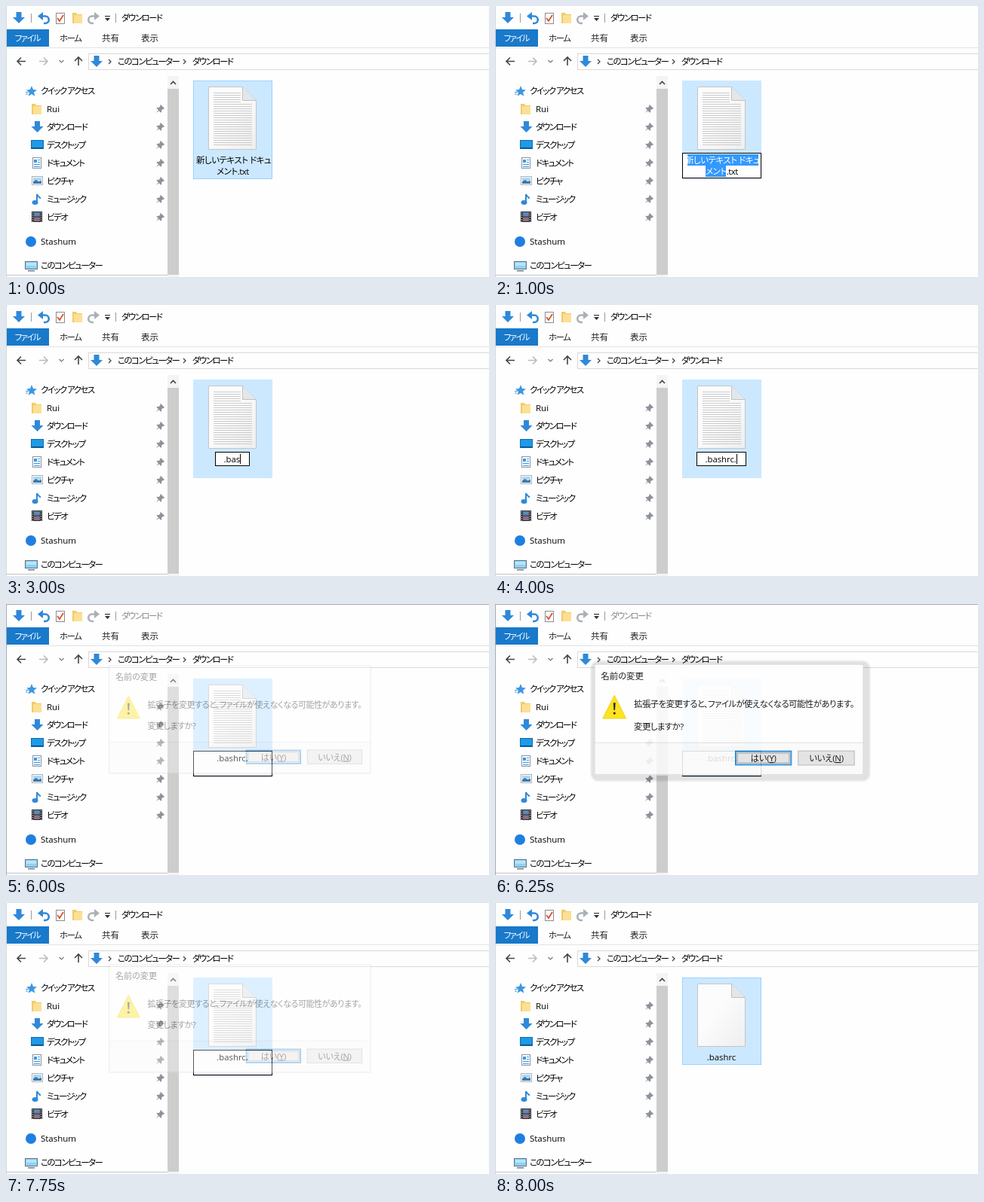
Write an HTML page that moves like this. It is 640 px wide and 360 px high and loops after 10 s.

```html
<!DOCTYPE html>
<html lang="ja">
<head>
<meta charset="utf-8">
<title>ファイル名の変更</title>
<style>
html, body { margin: 0; width: 100%; height: 100%; overflow: hidden; background: #fefefe; }
svg { display: block; width: 100vw; height: 100vh; }
text {
  font: 11.5px "Open Sans", "Noto Sans CJK JP", "Noto Sans CJK", sans-serif;
  font-feature-settings: "palt";
  fill: #000;
  white-space: pre;
}
.kana { letter-spacing: -1.55px; }
.mixed { letter-spacing: -.5px; }
.body { letter-spacing: -.52px; }
.key { letter-spacing: -.25px; }
.name { font-size: 11.3px; }
.mid { text-anchor: middle; }
</style>
</head>
<body>
<svg id="stage" viewBox="0 0 640 360" xmlns="http://www.w3.org/2000/svg"></svg>
<script>
const BLUE = '#2f89d8';
const SELECT = '#cce8ff';
const LOOP = 10000;

const at = (x, y, body) => `<g transform="translate(${x} ${y})">${body}</g>`;
const rect = (x, y, w, h, fill, more = '') =>
  `<rect x="${x}" y="${y}" width="${w}" height="${h}" fill="${fill}" ${more}/>`;
const frame = (x, y, w, h, fill, stroke) =>
  rect(x + .5, y + .5, w - 1, h - 1, fill, `stroke="${stroke}"`);
const fillPath = (d, fill) => `<path d="${d}" fill="${fill}"/>`;
const linePath = (d, stroke, width = 1) =>
  `<path d="${d}" fill="none" stroke="${stroke}" stroke-width="${width}"/>`;
const label = (x, y, str, cls = 'kana', fill = '#000') =>
  `<text x="${x}" y="${y}" class="${cls}" style="fill:${fill}">${str}</text>`;

const icon = {
  down: fillPath('M4 0h7v7h4.500L7.500 15 -.5 7H4z', BLUE),
  folder: fillPath('M0 1h5l1 2h7v12H0z', '#f0cb68') + fillPath('M2 4h11v11H2z', '#fddf94'),
  star: fillPath('M8 0l2 5 5 .4-4 3.300 1.400 5L8 11l-4.400 2.700L5 8.700 1 5.400 6 5z', '#3b97e0') +
    linePath('M0 8.500h4M0 11h3', '#3b97e0'),
  desktop: frame(-1, 1, 17, 12, '#1c9be8', '#1768a8') + rect(0, 11, 15, 1, '#0c4c7c'),
  doc: frame(1, 0, 12, 15, '#fff', '#8795a3') + rect(3, 3, 4, 4, '#3b97e0') +
    linePath('M8 3.500h3M8 6.500h3M3 9.500h8M3 12.500h8', '#3b97e0'),
  picture: frame(0, 1, 15, 12, '#fff', '#a7b1ba') + rect(2, 3, 11, 4, '#a9d8f5') +
    fillPath('M2 11V8l4-2 3 2 4-1v4z', '#3f79a8'),
  music: linePath('M7 12V1q1 3 5 5.500', BLUE, 2) +
    `<ellipse cx="4.500" cy="12" rx="4" ry="3" fill="${BLUE}"/>`,
  video: rect(0, 0, 14, 14, '#2b2b2b') + rect(3, 1, 8, 5.5, '#5c86b5') + rect(3, 7.5, 8, 5.5, '#8a6f86') +
    '<path d="M1.500 1v13M12.500 1v13" stroke="#ddd" stroke-dasharray="1.500 1.500"/>',
  cloud: '<circle cx="8" cy="7" r="7" fill="#1f7fe0"/>',
  pc: frame(0, 0, 17, 11, '#8fd0f5', '#5f7382') + rect(2, 2, 13, 4, '#b9e4fa') + rect(4, 12, 9, 1.5, '#6e7c88'),
  pin: fillPath('M6 0l5 5-1 1-1-.3-2 2 .2 2-1 1L3.700 8.200 0 11l2.800-3.700L.5 4.800l1-1 2 .2 2-2L5 1z', '#8c939d')
};

const chevron = (x, y) => linePath(`M${x} ${y - 3}l3 3-3 3`, '#444', 1.3);
const arrow = (x, color) => linePath(`M${x + 12} 73.500H${x + 1}m5 -5l-5 5 5 5`, color, 1.6);
const curl = color => linePath('M5 5h5a4.500 4.500 0 0 1 0 9.500H8', color, 2.6) + fillPath('M0 5l7-5.500v11z', color);

function titleBar() {
  return at(9.5, 8, icon.down) +
    linePath('M33.500 10v12M145.500 10v12', '#999') +
    at(42, 8.5, curl(BLUE)) +
    frame(66, 9, 12, 15, '#fff', '#8c8c8c') + linePath('M68 16l3 4 5-8', '#d9512c', 1.8) +
    at(88, 8, icon.folder) +
    `<g transform="translate(124 8.500) scale(-1 1)">${curl('#aab0b6')}</g>` +
    rect(131, 13, 7, 1.2, '#333') + fillPath('M131 16h7l-3.500 4z', '#333') +
    '<g id="caption">' + label(153, 20, 'ダウンロード') + '</g>';
}

function ribbon() {
  return rect(0, 55, 640, 1, '#e2e3e4') + rect(1, 31, 56, 23, '#1979ca') +
    label(11.5, 46.5, 'ファイル', 'kana', '#fff') +
    label(71, 46.5, 'ホーム', 'kana', '#222') +
    label(127, 46.5, '共有', '', '#222') +
    label(179, 46.5, '表示', '', '#222');
}

function addressBar() {
  return arrow(14, '#444') +
    `<g transform="translate(100 0) scale(-1 1)">${arrow(44, '#bbb')}</g>` +
    linePath('M70.500 72l3 3 3-3', '#777', 1.2) +
    linePath('M96 79V68m-5 5l5-5 5 5', '#444', 1.6) +
    frame(109, 63, 540, 22, '#fefefe', '#d9d9d9') +
    at(112.5, 66, icon.down) + chevron(136, 74) +
    label(148, 78, 'このコンピューター') + chevron(235, 74) +
    label(247, 78, 'ダウンロード');
}

function sidebar() {
  const pinned = [
    ['folder', 'Rui'], ['down', 'ダウンロード'], ['desktop', 'デスクトップ'], ['doc', 'ドキュメント'],
    ['picture', 'ピクチャ'], ['music', 'ミュージック'], ['video', 'ビデオ']
  ];
  const rows = pinned.map(([kind, str], i) => {
    const y = 136 + i * 24;
    return at(34, y - 7, icon[kind]) + label(54, y + 4.5, str, i ? 'kana' : '') + at(199, y - 5, icon.pin);
  });
  return rect(0, 0, 1, 360, '#d8d8d8') + rect(0, 357, 215, 1, '#c4c4c4') +
    at(26, 106, icon.star) + label(46, 117, 'クイック アクセス') + rows.join('') +
    at(25, 306, icon.cloud) + label(46, 317, 'Stashum', '') +
    at(25, 339, icon.pc) + label(46, 349, 'このコンピューター') +
    rect(214, 93, 15, 267, '#f4f4f4') + rect(214, 110, 15, 247, '#cdcdcd') +
    linePath('M218 104l3.500-3.500 3.500 3.500', '#444', 1.6);
}

function page(lined) {
  let lines = '';
  for (let y = 115.5; lined && y < 185; y += 3) lines += `M275 ${y}H${y < 128 ? 311 : 326}`;
  return fillPath('M268.500 107.500h45l18 18v65h-63z', 'url(#paper)') +
    linePath('M268.500 107.500h45l18 18v65h-63z', '#c3c6c9') +
    linePath(lines, '#cbcbcb') +
    fillPath('M313.500 107.500l18 18h-18z', '#e4e7ea') + linePath('M313.500 107.500v18h18', '#bdc1c5');
}

const selection = (h, edge) => frame(248, 99, 105, h, SELECT, edge);
const nameLines = (first, stem, ext) =>
  label(301.5, 209.3, '新しいテキスト ドキュ', 'mixed mid', first) +
  `<text x="300.5" y="224.300" class="body mid"><tspan style="fill:${stem}">メント</tspan>` +
  `<tspan style="fill:${ext}">.txt</tspan></text>`;
const bigBox = () => frame(248, 195, 105, 34, '#fff', '#000');

const boxWidths = [28, 35, 41, 46, 53, 57, 63, 66];
function typing(count) {
  const w = boxWidths[count - 1];
  const x = Math.round(300.2 - w / 2);
  return frame(x, 195, w, 19, '#fff', '#000') +
    label(x + 11.5, 209, '.bashrc.'.slice(0, count), 'name') +
    rect(x + w - 13, 198, 1, 13, '#000');
}

function fileView(t) {
  if (t < 1000) return selection(131, '#99d1ff') + page(true) + nameLines('#000', '#000', '#000');
  if (t >= 8000) return selection(116, '#99d1ff') + page(false) + label(300, 209, '.bashrc', 'name mid');
  const base = selection(131, SELECT) + page(true);
  if (t < 2000) {
    const all = t >= 1500;
    return base + bigBox() + rect(255, 197, 94, 15, '#3399ff') +
      rect(279, 212, all ? 44 : 27, 15, '#3399ff') + nameLines('#fff', '#fff', all ? '#fff' : '#000');
  }
  if (t < 6000) {
    const count = t < 2500 ? 1 : Math.min(8, 2 + Math.floor((t - 2500) / 250));
    return base + typing(count);
  }
  return base + bigBox() + label(300, 209, '.bashrc.', 'name mid');
}

const button = (x, str, key, focus) =>
  frame(x, 195, 76, 20, '#e1e1e1', focus ? '#0078d7' : '#adadad') +
  (focus ? rect(x + 1.5, 196.5, 73, 17, 'none', 'stroke="#0078d7"') +
    rect(x + 3.5, 198.5, 69, 13, 'none', 'stroke="#555" stroke-dasharray="1 1"') : '') +
  `<text x="${x + 38}" y="209.500" class="key mid">${str}(<tspan text-decoration="underline">${key}</tspan>)</text>`;

function dialogView() {
  return '<rect id="shadow" x="125.500" y="75" width="373" height="161" rx="10" fill="#000" filter="url(#soft)"/>' +
    rect(130, 79, 360, 149, '#fff') + rect(130, 184, 360, 44, '#fafafa') + rect(130, 184, 360, 1, '#dfdfdf') +
    rect(130.5, 79.5, 359, 148, 'none', 'stroke="#c8c8c8"') +
    label(139, 99.3, '名前の変更', '') +
    '<path d="M157 121l15.500 31h-31z" fill="#ffe000" stroke="#eccb00" stroke-linejoin="round"/>' +
    fillPath('M155.500 131h3l-.7 10h-1.600z', '#111') + '<circle cx="157" cy="145" r="1.600" fill="#111"/>' +
    label(183, 137, '拡張子を変更すると、ファイルが使えなくなる可能性があります。', 'body') +
    label(183, 167, '変更しますか?', 'mixed') +
    button(318, 'はい', 'Y', true) + button(402, 'いいえ', 'N', false);
}

// Scale and opacity of the dialog, held for each quarter second
function dialogPose(t) {
  if (t < 6000 || t >= 8000) return [1, 0];
  if (t < 6250 || t >= 7750) return [.965, .35];
  return t < 6500 ? [.992, .88] : [1, 1];
}

const stage = document.getElementById('stage');
stage.innerHTML =
  '<defs><linearGradient id="paper" x2="1" y2="1"><stop offset=".4" stop-color="#fcfcfc"/>' +
  '<stop offset="1" stop-color="#eeeeef"/></linearGradient>' +
  '<filter id="soft"><feGaussianBlur stdDeviation="1"/></filter></defs>' +
  rect(0, 0, 640, 360, '#fefefe') + titleBar() + ribbon() + addressBar() + sidebar() +
  '<g id="file"></g><path id="edge" d="M640 .5H.5V360" fill="none" stroke="#aaa"/>' +
  '<g id="dialog">' + dialogView() + '</g>';

const find = id => document.getElementById(id);
const file = find('file'), dialog = find('dialog'), shadow = find('shadow');
const caption = find('caption'), edge = find('edge');
let shown = -1;

function draw(t) {
  const step = Math.floor(t / 250);
  if (step === shown) return;
  shown = step;
  file.innerHTML = fileView(t);
  const [scale, alpha] = dialogPose(t);
  dialog.setAttribute('transform', `translate(310 153) scale(${scale}) translate(-310 -153)`);
  dialog.setAttribute('opacity', alpha);
  shadow.setAttribute('opacity', alpha < .5 ? 0 : .13);
  const inactive = t >= 6000 && t < 6750;
  caption.setAttribute('opacity', inactive ? .45 : 1);
  edge.setAttribute('opacity', inactive ? 1 : 0);
}

const start = performance.now();
function tick() {
  draw((performance.now() - start) % LOOP);
  requestAnimationFrame(tick);
}
tick();
</script>
</body>
</html>
```
